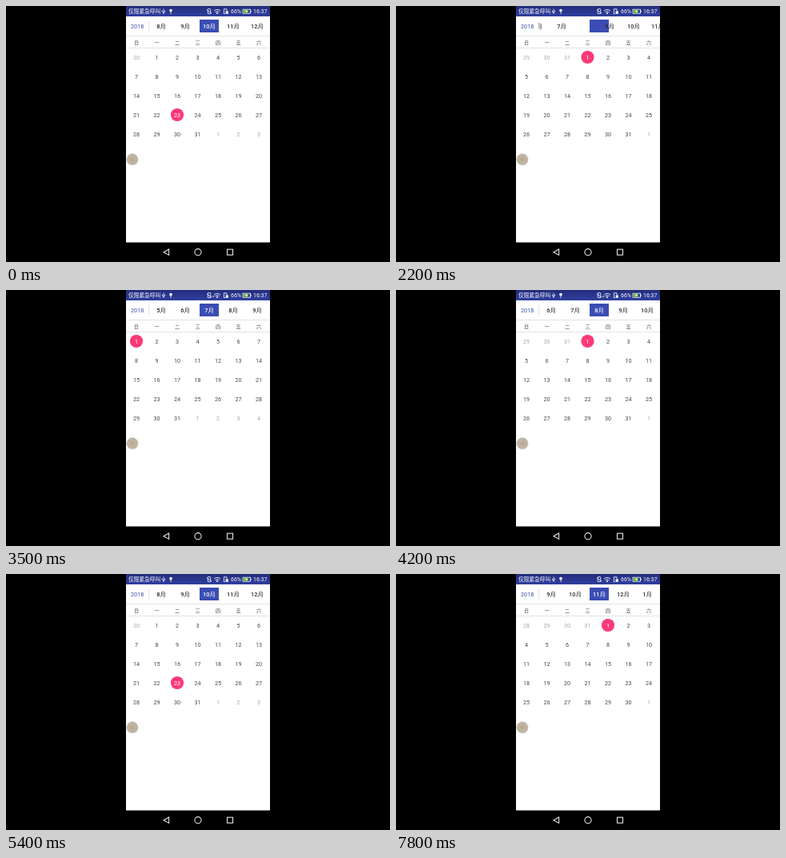
An HTML page that plays this animation: 480x320 px, repeating every 8 s.

```html
<!DOCTYPE html>
<html lang="zh">
<head>
<meta charset="utf-8">
<title>Calendar</title>
<style>
html, body { margin: 0; width: 100%; height: 100%; overflow: hidden; background: #000; }
svg { display: block; width: 480px; height: 320px; }
text { font: 7.2px Roboto, "Noto Sans CJK SC", "Noto Sans CJK", sans-serif; fill: #484848; }
.mid { text-anchor: middle; }
.month { font-size: 7.4px; font-weight: 500; fill: #2c2c2c; }
.week { font-size: 6.2px; fill: #444; }
.year { font-size: 7.3px; fill: #3f51b5; }
.other { fill: #a8a8a8; }
.on { fill: #fff; }
.status { fill: #fff; font-size: 7px; }
.thin { fill: none; stroke: #fff; stroke-width: .8; }
</style>
</head>
<body>
<svg id="stage" viewBox="0 0 480 320" xmlns="http://www.w3.org/2000/svg">
  <defs>
    <clipPath id="screen"><rect x="150" y="13" width="180" height="282"/></clipPath>
    <clipPath id="strip"><rect x="178" y="13" width="152" height="24"/></clipPath>
    <linearGradient id="bar" x2="0" y2="1">
      <stop offset="0" stop-color="#232d7c"/><stop offset="1" stop-color="#303f9f"/>
    </linearGradient>
    <radialGradient id="knob">
      <stop offset="0" stop-color="#b9a389"/><stop offset=".6" stop-color="#c3b5a2"/><stop offset="1" stop-color="#b5afa8"/>
    </radialGradient>
  </defs>
  <rect width="480" height="320"/>
  <rect x="150" y="13" width="180" height="282.5" fill="#fff"/>
  <rect x="150" width="180" height="13" fill="url(#bar)"/>

  <text class="status" x="153" y="9.2" style="font-size:6.7px;font-weight:500">仅限紧急呼叫</text>
  <path class="thin" stroke-width=".6" d="M197 3.5V10M195.3 5.8V7.2L197 8.4L198.7 7V5.6"/>
  <circle cx="206" cy="5.6" r="1.8" fill="#fff"/>
  <path class="thin" d="M206 7V10"/>
  <rect class="thin" x="252.3" y="3.6" width="3.4" height="6" rx=".6"/>
  <path class="thin" d="M251 4.6L257 9.4"/>
  <path class="thin" d="M260 6Q264 2.7 268 6M261.5 7.6Q264 5.5 266.5 7.6"/>
  <circle cx="264" cy="9" r="1" fill="#fff"/>
  <path id="signal" class="thin" d="M257.5 8H260.5"/>
  <path class="thin" d="M272.4 9.6V3.8H276V6M272.4 9.6H274"/>
  <rect x="274.6" y="6.4" width="3.2" height="3.4" fill="#fff"/>
  <text class="status" x="281" y="9.2">66%</text>
  <rect class="thin" x="296" y="4.2" width="9.4" height="5"/>
  <rect x="296.6" y="4.8" width="6" height="3.8" fill="#69c23c"/>
  <rect x="305.6" y="5.7" width="1" height="2" fill="#fff"/>
  <path d="M301.2 4.4L299 7H300.6L299.9 9L302.3 6.3H300.7Z" fill="#fff"/>
  <text class="status" x="309" y="9.2">16:37</text>

  <text class="year" x="156" y="27.6">2018</text>
  <path d="M178.5 19V31" stroke="#e3e3e3"/>
  <rect x="242" y="17" width="24" height="16" fill="#3b4db3"/>
  <g clip-path="url(#strip)"><g id="months"></g></g>
  <path d="M150 37.5H330M150 52.5H330" stroke="#e2e2e2"/>
  <g id="pages" clip-path="url(#screen)"></g>

  <circle cx="158" cy="191.8" r="7.2" fill="url(#knob)" stroke="#d8d4cf" stroke-width=".6"/>

  <g fill="none" stroke="#e4e4e4" stroke-width="1.1">
    <path d="M203.6 304V311.4L197 307.7Z"/>
    <circle cx="240" cy="307.7" r="4.1"/>
    <rect x="276.5" y="304.2" width="7" height="7"/>
  </g>
</svg>
<script>
const NS = "http://www.w3.org/2000/svg";
const LOOP = 8000, STEP = 100, PAGE = 180, GAP = 30;
const $ = id => document.getElementById(id);

// at: month switches; from: scroll begins; slide: the page scrolls instead of the strip
const moves = [
  { at: 0, month: 10, from: -1000, dur: 1 },
  { at: 2100, month: 8, from: 2106, dur: 420 },
  { at: 3100, month: 7, from: 3017, dur: 360 },
  { at: 4000, month: 8, from: 3917, dur: 360 },
  { at: 5100, month: 10, from: 5106, dur: 420 },
  { at: 7600, month: 11, from: 7529, dur: 300, slide: true }
];

function add(parent, tag, attrs, content) {
  const el = document.createElementNS(NS, tag);
  for (const k in attrs) el.setAttribute(k, attrs[k]);
  if (content !== undefined) el.textContent = content;
  return parent.appendChild(el);
}

function makePage(month) {
  const page = add($("pages"), "g", {});
  const first = new Date(2018, month - 1, 1).getDay();
  const chosen = month === 10 ? 23 : 1;
  const colX = i => 163 + 25.5 * (i % 7);
  [..."日一二三四五六"].forEach((name, i) =>
    add(page, "text", { class: "mid week", x: colX(i), y: 47.6 }, name));
  for (let i = 0; i < 35; i++) {
    const date = new Date(2018, month - 1, 1 - first + i);
    const x = colX(i), y = 64 + 24 * Math.floor(i / 7);
    const inside = date.getMonth() === month - 1;
    const on = inside && date.getDate() === chosen;
    if (on) add(page, "circle", { cx: x, cy: y, r: 8.1, fill: "#fb3977" });
    add(page, "text", { class: "mid " + (on ? "on" : inside ? "" : "other"), x, y: y + 2.6 }, date.getDate());
  }
  return page;
}

const pages = {};
for (const m of [7, 8, 10, 11]) pages[m] = makePage(m);

const labels = [];
for (let m = 4; m <= 14; m++)
  labels.push({ m, el: add($("months"), "text", { class: "mid month", x: m * GAP, y: 27.7 }, (m - 1) % 12 + 1 + "月") });

function left(t, { from, dur }) {
  const p = Math.min(1, Math.max(0, (t - from) / dur));
  return (1 - p) ** 5;
}

function shiftPage(page, x) {
  page.style.display = "";
  page.setAttribute("transform", `translate(${x} 0)`);
}

function draw(t) {
  let i = moves.length - 1;
  while (moves[i].at > t) i--;
  const move = moves[i], prev = moves[Math.max(0, i - 1)];
  const rest = left(t, move);
  const lag = move.slide ? 0 : (move.month - prev.month) * GAP * rest;
  const slide = move.slide ? Math.round(PAGE * rest) : 0;

  $("months").setAttribute("transform", `translate(${Math.round(254 - move.month * GAP + lag)} 0)`);
  for (const { m, el } of labels) el.classList.toggle("on", m === move.month);
  for (const m in pages) pages[m].style.display = "none";
  shiftPage(pages[move.month], slide);
  if (slide) shiftPage(pages[prev.month], slide - PAGE);
  $("signal").style.display = t >= 3500 && t < 5100 ? "" : "none";
}

const start = performance.now();
function tick() {
  const t = (performance.now() - start) % LOOP;
  draw(Math.floor(t / STEP) * STEP);
  requestAnimationFrame(tick);
}
tick();
</script>
</body>
</html>
```
